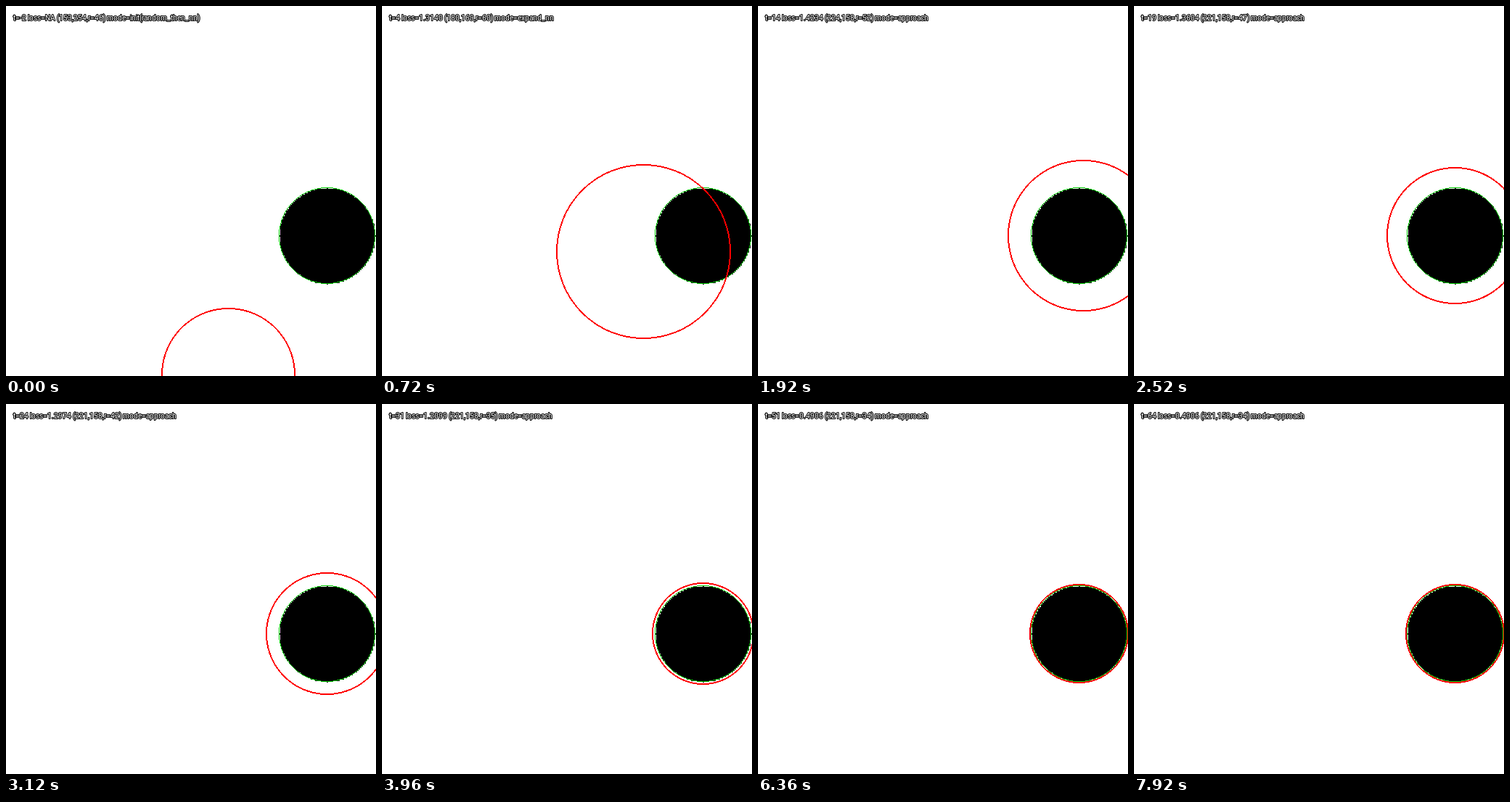
Animation of 510 by 510 pixels, one loop 8 s. Source, as an HTML page with a canvas:

```html
<!DOCTYPE html>
<html lang="en">
<head>
<meta charset="utf-8">
<title>Circle fitting</title>
<style>
  html, body { margin: 0; width: 100%; height: 100%; overflow: hidden; background: #fff; }
  canvas { display: block; }
</style>
</head>
<body>
<canvas id="stage" width="510" height="510"></canvas>
<script>
const ctx = document.getElementById('stage').getContext('2d');
const SCALE = 2, STEP_MS = 120, LOOP_MS = 8000;
const goal = { x: 221, y: 158, r: 33 };

// Path of the search circle: [t, x, y, r]
const path = [
  [-2, 153, 254, 46], [4, 180, 169, 60], [5, 192, 163, 61], [6, 204, 159, 60],
  [8, 222, 156, 58], [12, 226, 156, 54], [14, 224, 158, 52], [17, 221, 158, 49],
  [32, 221, 158, 34], [65, 221, 158, 34]
];

function circleAt(t) {
  const i = path.findIndex((p, n) => n > 0 && t <= p[0]);
  const from = path[i - 1], to = path[i];
  const f = (t - from[0]) / (to[0] - from[0]);
  const [x, y, r] = [1, 2, 3].map(n => Math.round(from[n] + f * (to[n] - from[n])));
  return { x, y, r };
}

function lossAt(t, r) {
  if (t < 0) return 'NA';
  if (t < 6) return (1.314 + Math.max(0, 4 - t) * 0.09 + Math.max(0, t - 4) * 0.1).toFixed(4);
  if (t >= 32) return '0.4906';
  return (1.2974 + (r - 42) * (r > 42 ? 0.0126 : 0.0125)).toFixed(4);
}

const modeAt = t => t < 0 ? 'init(random_then_nn)' : t < 6 ? 'expand_nn' : 'approach';

// Paints every cell of a square grid around a centre that passes the test
function paintCells(cx, cy, r, size, color, inside) {
  ctx.fillStyle = color;
  for (let dy = -r; dy <= r; dy++) {
    for (let dx = -r; dx <= r; dx++) {
      if (inside(Math.abs(dx), Math.abs(dy))) {
        ctx.fillRect((cx + dx) * size, (cy + dy) * size, size, size);
      }
    }
  }
}

function disc({ x, y, r }, color) {
  paintCells(x, y, r, SCALE, color, (dx, dy) => dx * dx + dy * dy <= r * r);
}

// Midpoint circles: one cell per step along the major axis of each octant
function outline(circle, width, color) {
  const [x, y, r] = [circle.x, circle.y, circle.r].map(v => v * SCALE);
  const edge = (radius, minor) => Math.round(Math.sqrt(Math.max(0, radius * radius - minor * minor)));
  paintCells(x, y, r, 1, color, (dx, dy) => {
    const major = Math.max(dx, dy), minor = Math.min(dx, dy);
    return major <= edge(r, minor) && major >= edge(r - width + 1, minor);
  });
}

// Outlined label with letters set on whole pixels
function label(text, x, y) {
  ctx.font = '10.05px Roboto, "Liberation Sans", sans-serif';
  ctx.lineWidth = 2;
  ctx.lineJoin = 'round';
  ctx.strokeStyle = '#000';
  ctx.fillStyle = '#fff';
  const letters = [...text].map(ch => {
    const letter = [ch, x, y];
    x += Math.round(ctx.measureText(ch).width);
    return letter;
  });
  letters.forEach(l => ctx.strokeText(...l));
  letters.forEach(l => ctx.fillText(...l));
}

function draw(t) {
  const c = circleAt(t);
  ctx.fillStyle = '#fff';
  ctx.fillRect(0, 0, 510, 510);
  disc(goal, '#000');
  outline(goal, 1, '#00c800');
  outline(c, 2, '#f00');
  label(`t=${t} loss=${lossAt(t, c.r)} (${c.x},${c.y},r=${c.r}) mode=${modeAt(t)}`, 10, 20);
}

const start = performance.now();
let shown = null;
function tick() {
  const elapsed = (performance.now() - start) % LOOP_MS;
  const t = Math.floor(elapsed / STEP_MS) - 2;
  if (t !== shown) draw(shown = t);
  requestAnimationFrame(tick);
}
tick();
</script>
</body>
</html>
```
